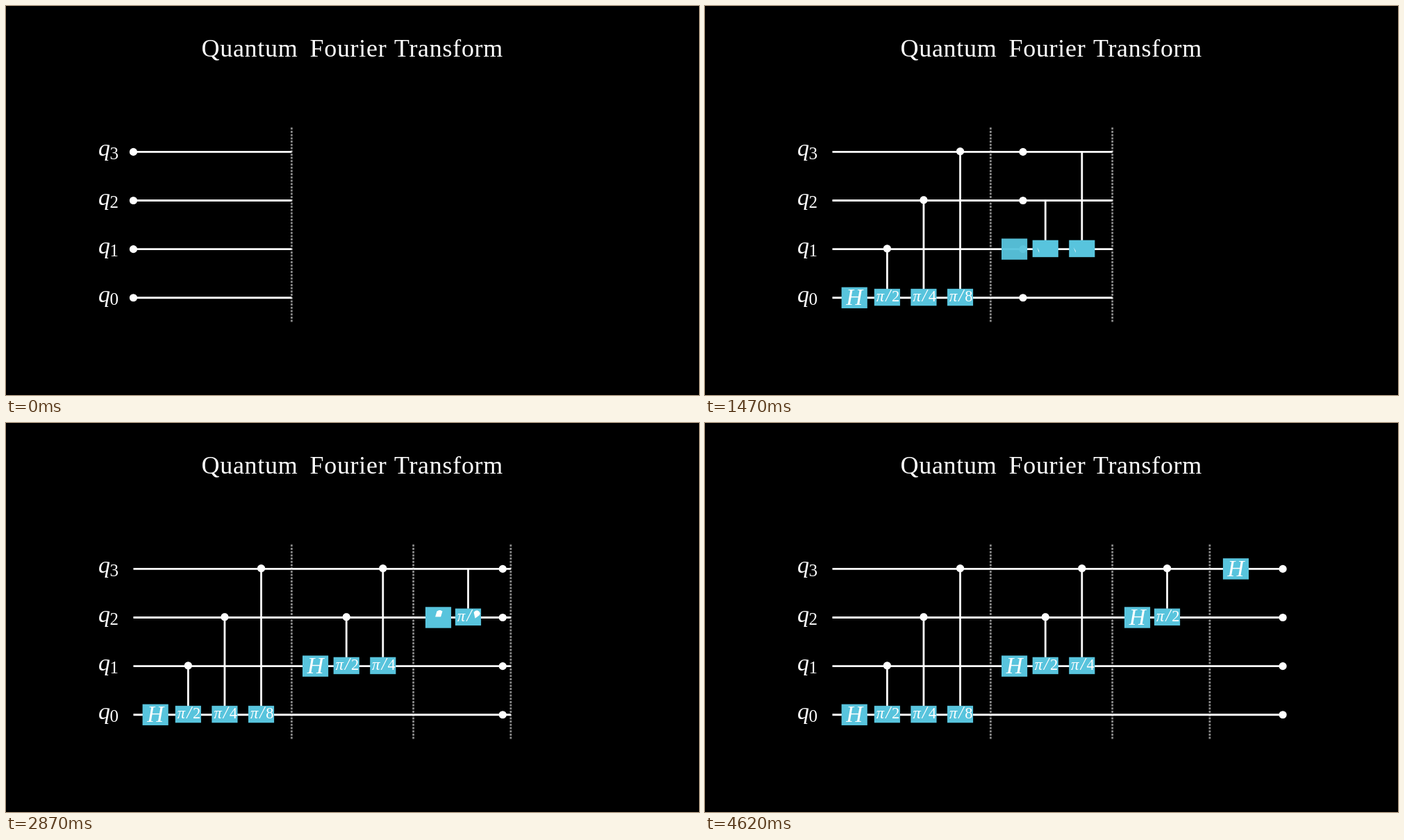
An HTML page for the animation above (6.3 s loop, 998x561 px).

```html
<!DOCTYPE html>
<html lang="en">
<head>
<meta charset="utf-8">
<title>Quantum Fourier Transform</title>
<style>
  html, body { margin: 0; width: 100%; height: 100%; overflow: hidden; background: #000; }
  svg { display: block; width: 998px; height: 561px; }
  text { fill: #fff; font-family: "Liberation Serif", serif; }
  .title { font-size: 36px; letter-spacing: .7px; }
  .i { font-style: italic; }
  .wire, .link { stroke: #fff; stroke-width: 2.8; }
  .bar { stroke: #888; stroke-width: 2.8; stroke-dasharray: 3 1.7; }
  .dot, .ink { fill: #fff; }
  .box { fill: #58c4dd; }
</style>
</head>
<body>
<svg id="stage" viewBox="0 0 998 561">
  <text class="title" y="73"><tspan x="281.5">Quantum</tspan><tspan x="437.5">Fourier</tspan><tspan x="559">Transform</tspan></text>
</svg>
<script>
const STEP = 70, LOOP = 6300, PHASE = 15;
const UNIT = 561 / 8, QUBITS = 4, RADIUS = .08 * UNIT;
const stage = document.getElementById('stage');
const px = u => 499 + u * UNIT;
const py = u => 280.5 - u * UNIT;

const stops = [-4.5, -1.25, 1.25, 3.25, 4.75];
const rows = Array.from({ length: QUBITS }, (_, i) => py(1 - i));

const clamp = v => Math.min(1, Math.max(0, v));
const sigmoid = v => 1 / (1 + Math.exp(-v));
const low = sigmoid(-5);
const smooth = v => clamp((sigmoid(10 * (clamp(v) - .5)) - low) / (1 - 2 * low));

function add(parent, tag, attrs, text) {
  const el = document.createElementNS('http://www.w3.org/2000/svg', tag);
  for (const k in attrs) el.setAttribute(k, attrs[k]);
  if (text) el.textContent = text;
  return parent.appendChild(el);
}
const show = (el, on) => el.setAttribute('visibility', on ? 'visible' : 'hidden');

const arc = (x, y, r, from, to, n) => Array.from({ length: n + 1 }, (_, i) => {
  const a = (from + (to - from) * i / n) * Math.PI / 180;
  return [x + r * Math.cos(a), y + r * Math.sin(a)];
});

// Rough outlines in pen order, seen only while a glyph is being drawn
const halfH = [[12.5, -10.5], [3, -10.5], [6, -9], [3.6, -1], [-4.4, -1], [-2, -9], [1, -10.5], [-8, -10.5]];
const pen = {
  H: [...halfH, ...halfH.map(([x, y]) => [-x, -y])],
  'π': [[-12, -2], [-9, 6], [-9.5, -3], [-4, -4.5], [-15, -4.5], [-13, 5]],
  '/': [[6, -10], [5, -10], [-3.5, 10], [-2.5, 10]],
  2: [[10, 2], ...arc(12.5, -5, 4.6, 30, -190, 6), ...arc(12.5, -5, 3, -190, 30, 14), [8, 5.5], [17, 5.5]],
  4: [[14, 4], [11.4, 5.5], [17.5, 5.5], [15.5, 3], [15.5, -9], [7.6, 1], [7.6, 2], [14, 2]],
  8: [...arc(11.3, -5.6, 3.4, 120, -240, 6), ...arc(12, -5.3, 4.2, 120, -240, 8), ...arc(12, 1.6, 4.6, -90, 270, 8)]
};
const circle = arc(0, 0, RADIUS, 0, -360, 32);

// First part of an outline, closed by a straight edge
function partial(pts, p) {
  if (p <= 0) return '';
  const end = p * (pts.length - 1), n = Math.floor(end), f = end - n;
  const out = pts.slice(0, n + 1);
  if (f > 0) out.push(pts[n].map((v, i) => v + (pts[n + 1][i] - v) * f));
  return out.join(' ');
}

function makeBox(g, h) {
  const w = .53 * UNIT;
  const box = add(g, 'rect', { class: 'box', x: -w / 2, y: -h / 2, width: w, height: h });
  return p => box.setAttribute('opacity', p);
}

function makeGlyph(g, ch, x, y, size, style = 'i') {
  const ink = add(g, 'polygon', { class: 'ink' });
  const text = add(g, 'text', { x, y, 'font-size': size, class: style, 'text-anchor': 'middle' }, ch);
  return p => {
    ink.setAttribute('points', p < 1 ? partial(pen[ch], p) : '');
    show(text, p >= 1);
  };
}

function hadamard(x, row) {
  const g = add(stage, 'g', { transform: `translate(${x} ${rows[row]})` });
  return [makeBox(g, 30.4), makeGlyph(g, 'H', 0, 10.4, 33)];
}

function phaseGate(x, row, control, digit) {
  const y = rows[row] - .7, top = rows[control] - rows[row];
  const g = add(stage, 'g', { transform: `translate(${x} ${y})` });
  const link = add(g, 'line', { class: 'link', y1: top });
  const parts = [
    p => { link.setAttribute('y2', top + (-12 - top) * p); show(link, p > 0); },
    makeBox(g, 24.5),
    makeGlyph(g, 'π', -10, 5.7, 23),
    makeGlyph(g, '/', 1.3, 6, 25),
    makeGlyph(g, digit, 12.4, 5.7, 22.5, '')
  ];
  const knob = add(g, 'polygon', { class: 'dot', transform: `translate(0 ${top})` });
  parts.push(p => knob.setAttribute('points', partial(circle, p)));
  return parts;
}

rows.forEach((y, i) => {
  add(stage, 'text', { x: 133, y: y + 6, class: 'i', 'font-size': 34 }, 'q');
  add(stage, 'text', { x: 149.5, y: y + 10.3, 'font-size': 25 }, String(QUBITS - 1 - i));
});

const sections = stops.slice(1).map((u, i) => {
  const g = add(stage, 'g', {}), x1 = px(stops[i]), x2 = px(u);
  if (i < QUBITS - 1) add(g, 'line', { class: 'bar', x1: x2, x2, y1: py(1.5), y2: py(-2.5) });
  for (const y of rows) add(g, 'line', { class: 'wire', x1, x2, y1: y, y2: y });
  return g;
});

const dots = rows.map(cy => add(stage, 'circle', { class: 'dot', cy, r: RADIUS }));

// Section i: one H gate on its row, then a phase gate for every row above
const gates = sections.map((_, i) => {
  const row = QUBITS - 1 - i, left = stops[i], width = stops[i + 1] - left;
  const group = [hadamard(px(left + .607 - .0475 * width), row)];
  for (let j = 1; j <= row; j++) {
    group.push(phaseGate(px(left + .375 + .75 * j), row, row - j, 2 ** j));
  }
  return group;
});

function draw(ms) {
  const pos = Math.min(Math.floor(ms % LOOP / STEP) / PHASE, QUBITS);
  const cur = Math.min(Math.floor(pos), QUBITS - 1);
  const x = px(stops[cur] + (stops[cur + 1] - stops[cur]) * smooth(pos - cur));
  dots.forEach(d => d.setAttribute('cx', x));
  sections.forEach((s, i) => show(s, i <= cur));
  // The parts of each gate appear one after another
  gates.forEach((group, i) => {
    const t = clamp(pos - i);
    for (const parts of group) parts.forEach((set, k) => set(smooth(t * parts.length - k)));
  });
}

const start = performance.now();
function tick() {
  draw(performance.now() - start);
  requestAnimationFrame(tick);
}
tick();
</script>
</body>
</html>
```
